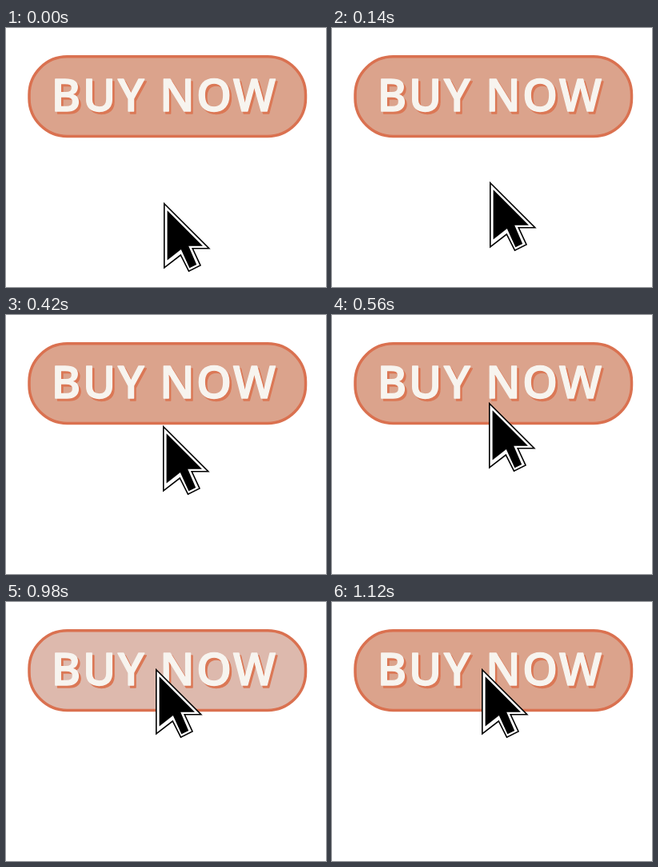
Animation of 400x324 px, one loop 1.26 s. Source, as an HTML page:

```html
<!DOCTYPE html>
<html lang="en">
<head>
<meta charset="utf-8">
<title>Buy now button</title>
<style>
  html, body { margin: 0; width: 100%; height: 100%; overflow: hidden; background: #fff; }
  svg { display: block; width: 100vw; height: 100vh; }
  #button { fill: #dba38c; stroke: #da7150; stroke-width: 3.5; }
  text {
    font: 600 56px "Open Sans", "Noto Sans", sans-serif;
    letter-spacing: 2.3px;
    stroke-width: 1.3;
    stroke-linejoin: round;
  }
  .shadow { fill: #db7856; stroke: #db7856; }
  .label { fill: #f7f4ef; stroke: #f7f4ef; }
  #sparks { stroke: #d4704f; stroke-width: 7.5; stroke-linecap: round; visibility: hidden; }
</style>
</head>
<body>
<svg viewBox="0 0 400 324">
  <rect id="button" x="29" y="35.8" width="345.5" height="99.6" rx="47.5"/>
  <text class="shadow" x="59.2" y="106.5">BUY NOW</text>
  <text class="label" x="56.5" y="104">BUY NOW</text>
  <path id="sparks" d="M42 12.5L44.5 25.5M21 23L32 34.5M9.5 45.5L23.5 48.5
    M375.5 121.5L388 126M363.5 132L373 143M354 141.5L353 148.5"/>
  <g id="cursor">
    <path fill="#fff" stroke="#000" stroke-width="1.6"
      d="M-.2 .8L55.8 56.8H35.2L45 78L30.5 85.2L20.3 65L-.2 80.8Z"/>
    <path d="M3.6 9.3L48 53.8H30.2L40.2 77L31.4 81.2L20.8 58L3.6 71.5Z"/>
  </g>
</svg>
<script>
  const LOOP = 1260;

  // Each step is [start in ms, value] and holds until the next one.
  function play(id, property, steps) {
    const frames = steps.map(([time, value]) =>
      ({ offset: time / LOOP, [property]: value, easing: "steps(1, end)" }));
    frames.push({ offset: 1, [property]: steps.at(-1)[1] });
    document.getElementById(id).animate(frames, { duration: LOOP, iterations: Infinity });
  }

  const at = (x, y) => `translate(${x}px, ${y}px)`;

  play("cursor", "transform", [
    [0, at(198, 219)],
    [140, at(198, 193)],
    [280, at(198, 169)],
    [420, at(197, 139)],
    [560, at(197, 110)],
    [700, at(188, 84)],
  ]);
  play("button", "fill", [[0, "#dba38c"], [700, "#ddb9ad"], [1120, "#dba38c"]]);
  play("sparks", "visibility", [[0, "hidden"], [700, "visible"], [980, "hidden"]]);
</script>
</body>
</html>
```
